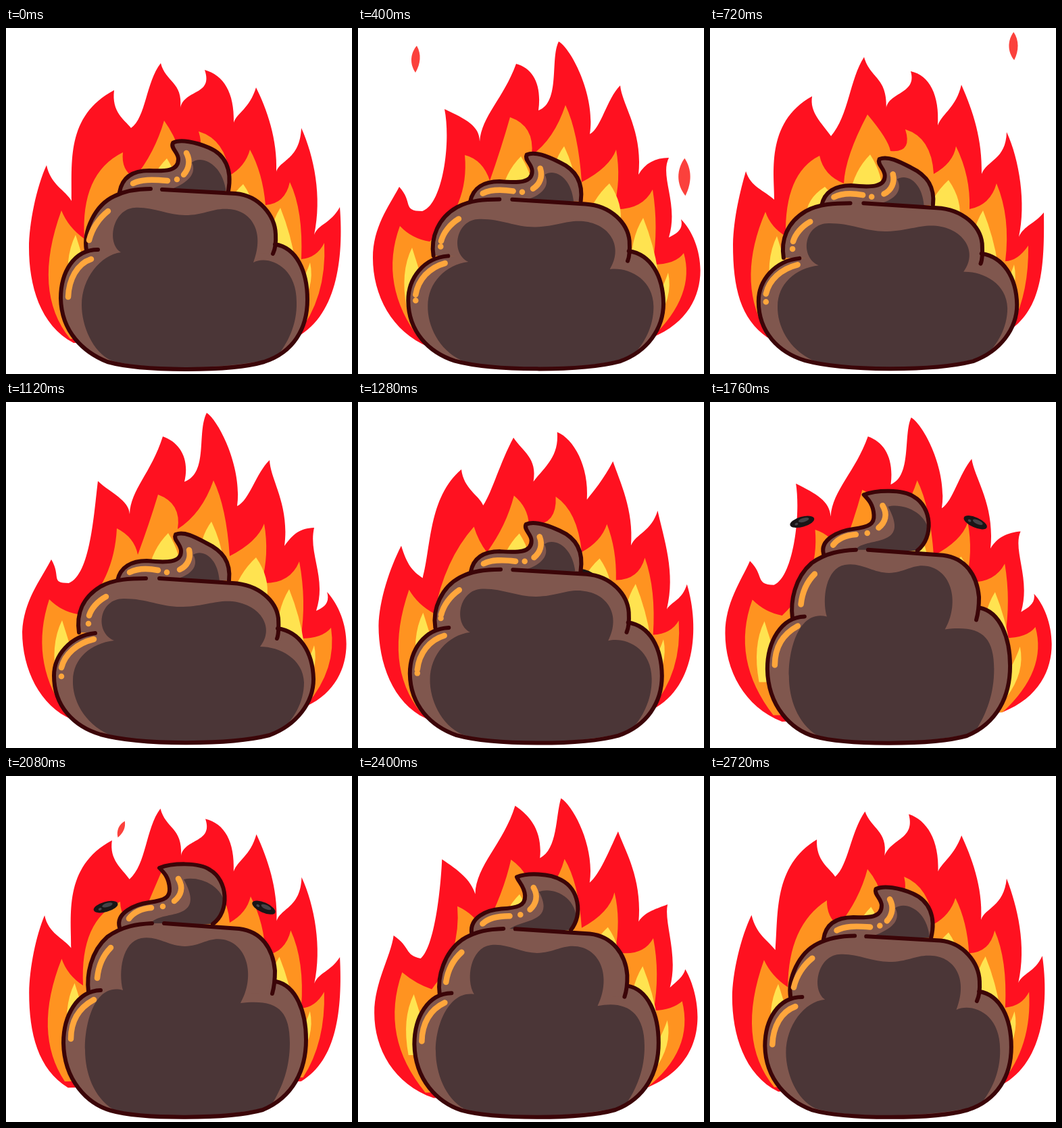
These frames come from a looping animation (512 px wide and 512 px high, 2.8 s). An HTML page with a canvas:

```html
<!DOCTYPE html>
<html>
<head>
<meta charset="utf-8">
<style>
html, body { margin: 0; width: 100%; height: 100%; overflow: hidden; background: #fff; }
canvas { display: block; width: 512px; height: 512px; }
</style>
</head>
<body>
<canvas id="stage" width="512" height="512"></canvas>
<script>
const ctx = document.getElementById('stage').getContext('2d');
const LOOP = 2800, STEP = 80, FLICKER = 688;
const RED = '#ff1120', ORANGE = '#ff9320', YELLOW = '#ffe350', EMBER = '#fb413c';
const BROWN = '#80574e', DARK = '#4b3637', INK = '#3b0508', SHINE = '#ffa63c';

// Moments within one flicker at which the flame poses below are reached
const FLAME_TIMES = [0, .047, .209, .581, .628];

const redPoses = [
  'M100 466C50 440 34 380 34 325C34 290 45 235 60 203C66 232 88 240 97 256C98 200 88 130 160 92C156 125 175 135 185 148C207 133 207 80 229 52C236 80 262 80 258 118C265 90 307 100 294 62C322 70 338 95 337 140C342 125 360 120 370 88C386 120 402 165 400 213C405 195 435 195 437 148C456 190 468 250 456 306C462 290 480 290 494 265C500 340 490 430 425 460Z',
  'M85 458C45 430 34 385 34 320C35 280 45 240 53 212C60 235 80 240 95 254C96 220 80 140 151 101C147 125 165 140 179 160C205 130 207 75 228 43C237 75 262 72 261 118C265 95 307 97 297 64C325 70 340 100 337 144C345 125 364 118 372 84C390 125 403 165 402 216C410 195 438 195 439 154C458 195 468 260 457 309C465 292 480 290 494 273C495 350 492 410 448 444Z',
  'M125 486C60 470 32 425 32 375C33 330 60 270 33 235C65 238 80 245 86 264C80 220 72 155 121 128C114 150 130 170 158 190C155 140 217 80 227 19C240 60 275 72 273 118C280 100 315 105 309 70C330 85 345 115 341 157C350 135 378 135 376 75C402 95 415 150 413 210C420 200 448 205 449 178C470 210 473 275 465 320C470 302 480 292 501 292C475 325 520 420 408 467Z',
  'M105 472C50 450 22 395 22 340C22 295 45 265 61 235C82 258 65 271 95 271C125 262 138 170 128 120C160 135 180 145 180 168C183 130 215 105 234 53C260 60 272 85 267 122C300 110 284 45 297 20C315 30 352 100 343 157C360 148 368 105 388 85C391 115 422 152 415 217C425 200 440 192 460 192C446 220 475 260 460 310C472 304 482 298 478 283C515 320 530 420 435 458Z',
  'M98 470C50 450 24 395 24 340C26 295 50 265 67 233C82 258 65 268 93 268C125 255 130 165 136 117C155 135 182 145 183 166C184 130 215 105 232 51C258 60 272 85 264 118C300 105 282 45 297 16C315 28 350 97 342 154C360 146 370 105 390 86C391 115 420 152 412 213C425 195 435 187 456 186C447 225 475 260 459 309C470 304 480 298 475 281C515 325 520 415 445 450Z'
];

const orangePoses = [
  'M95 460Q38 390 82 270Q92 295 116 312Q110 215 173 184Q170 210 190 222Q220 185 234 137Q250 160 255 178Q298 195 285 153Q325 165 331 218Q354 205 361 180Q380 215 384 262Q413 260 420 228Q440 270 437 342Q460 340 471 318Q475 400 430 455Z',
  'M80 445Q40 370 82 272Q90 295 112 308Q110 215 162 189Q168 218 198 230Q200 190 233 128Q264 165 267 182Q300 185 289 150Q328 162 331 216Q360 200 364 175Q386 220 384 268Q415 262 424 230Q445 280 437 345Q455 345 471 322Q472 390 448 438Z',
  'M115 480Q40 400 77 281Q105 295 118 312Q112 250 122 205Q135 230 165 235Q222 165 231 104Q245 150 262 178Q300 185 300 150Q328 165 331 215Q372 190 371 152Q388 185 386 242Q425 262 437 240Q453 285 441 340Q450 335 472 333Q485 435 405 470Z',
  'M92 462Q30 380 62 293Q80 312 106 316Q165 265 158 188Q185 195 195 226Q212 178 225 132Q262 145 257 188Q290 165 307 114Q326 155 331 228Q372 207 382 180Q390 225 378 268Q420 270 436 239Q445 295 436 350Q470 350 482 333Q500 395 435 458Z',
  'M85 455Q35 380 64 292Q82 310 106 314Q160 265 164 187Q190 200 195 226Q212 180 225 137Q260 150 254 188Q290 165 307 116Q326 155 331 228Q372 207 382 180Q390 225 378 268Q420 270 434 236Q445 295 436 350Q468 350 481 334Q490 395 445 448Z'
];

// Tips of the yellow tongues, one line per pose
const yellowPoses = [
  '103 306 172 262 238 193 300 230 351 231 406 266 450 347',
  '99 308 170 235 237 187 300 230 353 225 404 270 450 350',
  '93 315 172 262 233 138 300 220 361 207 416 280 452 358',
  '80 325 190 255 241 190 305 175 372 230 422 281 459 362',
  '83 323 190 255 240 194 304 177 370 230 419 277 456 360'
];
// Half width, height and sideways shift of each tongue's base
const tongues = [[18, 90, 10], [28, 45, 0], [24, 60, -6], [18, 60, 0], [26, 60, -10], [20, 80, 2], [10, 75, -30]];

// Every part of the pile as [squashed, resting, stretched]
const pile = {
  swirl: [
    'M165 264C169 244 186 235 208 235C238 238 260 238 259 220C258 209 247 204 251 196C264 191 280 200 297 209C320 220 333 236 330 264',
    'M168 243C172 220 188 211 212 211C236 212 255 212 255 194C255 184 243 178 247 170C258 164 281 169 300 177C324 187 335 209 329 241',
    'M168 224C162 203 190 190 212 187C236 184 243 179 242 166C241 150 234 143 227 136C245 129 285 127 302 139C328 154 332 200 306 219'],
  swirlShade: [
    'M240 264C272 260 287 244 277 226C291 217 314 230 316 266Z',
    'M232 242C264 234 284 218 275 199C290 187 322 202 326 245Z',
    'M214 220C222 196 300 220 263 153C290 146 345 170 316 226Z'],
  body: [
    'M132 342C95 346 71 375 71 405C71 450 100 480 140 492C200 508 330 508 390 493C430 478 455 445 455 410C454 370 435 340 402 335',
    'M136 328C100 328 81 362 81 400C82 450 115 480 150 494C200 508 330 509 382 494C425 480 446 445 446 402C446 360 430 325 398 320',
    'M140 317C105 318 85 355 85 395C86 450 120 485 155 495C200 508 330 508 380 494C425 475 444 435 444 390C444 350 430 310 399 304'],
  middle: [
    'M108 341C104 315 112 290 140 273C160 262 185 261 207 261M227 261L335 268C375 270 400 295 403 320C404 338 403 345 401 350',
    'M119 329C114 300 132 262 160 249C178 240 195 238 214 238M231 239L340 245C375 248 398 278 399 305C400 322 397 330 395 334',
    'M122 319C119 295 125 260 150 238C172 222 195 219 216 218M234 218L345 226C378 230 395 255 398 288C398 305 396 315 394 322'],
  shade: [
    'M160 353C130 340 138 290 175 291C210 291 230 304 262 303C295 302 310 293 335 295C378 300 398 335 376 362C405 362 440 380 441 415C441 445 425 470 408 485C340 508 210 508 152 492C115 475 98 440 99 412C99 380 125 357 160 353Z',
    'M170 332C148 318 158 268 190 266C215 264 240 277 265 277C295 277 305 266 330 268C362 270 384 300 366 347C385 336 430 350 430 405C431 440 416 468 400 487C340 505 210 508 156 492C128 480 112 440 112 410C112 370 140 336 170 332Z',
    'M173 317C166 290 172 245 200 240C225 236 240 252 265 252C290 251 300 238 322 242C360 250 368 300 347 336C400 330 420 345 420 395C420 430 410 460 392 488C340 505 210 508 158 493C130 475 117 440 117 405C116 370 130 305 173 317Z'],
  // Zero-length segments become round dots
  shine: [
    'M148 288C135 295 126 306 123 316M122 328L122 328M130 351C105 357 87 373 82 393M82 406L82 406M183 252C195 246 210 246 225 249M238 252L238 252M271 219C274 232 268 243 257 248',
    'M151 271C138 281 127 297 123 314M123 314L123 314M126 342C105 349 93 372 92 398M92 398L92 398M188 230C200 224 215 224 239 226M253 224L253 224M267 185C273 196 271 208 263 217',
    'M155 254C145 264 137 279 135 299M135 299L135 299M130 331C108 343 96 362 96 389M96 389L96 389M182 211C190 200 203 196 215 195M232 193L232 193M255 152C263 165 259 177 249 185']
};

const stretchKeys = { times: [0, 400, 720, 1120, 1200, 1440, 1520, 2080, 2160, 2720],
                      values: [0, -.67, -.92, -1, -1, .85, .92, 1, .98, .08] };
const flyOutKeys = { times: [0, 1200, 1520, 2080, 2400], values: [0, 0, 1, .92, 0] };

// start, end, x, y, dx, dy, height, tilt
const sparks = [
  [0, 500, 61, 246, 30, -250, 66, .1],
  [320, 840, 491, 269, -55, -315, 60, .03],
  [1440, 1760, 474, 215, -15, -200, 56, -.2],
  [1680, 2200, 147, 217, 30, -180, 38, .45]
];

const numbersOf = text => text.match(/-?[\d.]+/g).map(Number);
const fillIn = (template, values) => {
  let i = 0;
  return template.replace(/-?[\d.]+/g, () => values[i++].toFixed(2));
};

// Smooth periodic curve through keys
function spline(times, values, t, period) {
  const n = times.length;
  const time = i => times[(i + n) % n] + Math.floor(i / n) * period;
  const value = i => values[(i + n) % n];
  const slope = i => (value(i + 1) - value(i - 1)) / (time(i + 1) - time(i - 1));
  let k = n - 1;
  while (times[k] > t) k--;
  const span = time(k + 1) - time(k), p = (t - time(k)) / span, q = 1 - p;
  return q * q * (1 + 2 * p) * value(k) + p * p * (3 - 2 * p) * value(k + 1)
    + span * p * q * (q * slope(k) - p * slope(k + 1));
}

const poseTable = poses => ({ template: poses[0], sets: poses.map(numbersOf) });
const [red, orange, yellow] = [redPoses, orangePoses, yellowPoses].map(poseTable);
const flameValues = (table, u) =>
  table.sets[0].map((_, i) => spline(FLAME_TIMES, table.sets.map(s => s[i]), u, 1));

const pileSets = {};
for (const part in pile) pileSets[part] = pile[part].map(numbersOf);

function pilePath(part, s) {
  const [low, rest, high] = pileSets[part];
  const end = s < 0 ? low : high, amount = Math.abs(s);
  return fillIn(pile[part][1], rest.map((v, i) => v + (end[i] - v) * amount));
}

function fill(path, color) {
  ctx.fillStyle = color;
  ctx.fill(new Path2D(path));
}

function stroke(path, color, width) {
  ctx.strokeStyle = color;
  ctx.lineWidth = width;
  ctx.stroke(new Path2D(path));
}

function drawSpark([start, end, x, y, dx, dy, height, tilt], t) {
  const p = (t - start) / (end - start);
  if (p <= 0 || p >= 1) return;
  const h = height / 2 * Math.min(1, 6 * p) * Math.min(1, 3 * (1 - p));
  ctx.save();
  ctx.translate(x + dx * p, y + dy * p);
  ctx.rotate(tilt);
  ctx.scale(h, h);
  fill('M0 -1C.42 -.4 .42 .3 .1 1C-.42 .4 -.42 -.4 0 -1Z', EMBER);
  ctx.restore();
}

function drawFlames(t) {
  const u = t / FLICKER % 1;
  fill(fillIn(red.template, flameValues(red, u)), RED);
  fill(fillIn(orange.template, flameValues(orange, u)), ORANGE);
  const tips = flameValues(yellow, u);
  tongues.forEach(([w, h, shift], i) => {
    const x = tips[2 * i], y = tips[2 * i + 1], base = x + shift;
    fill(`M${base - w} ${y + h}Q${x - w} ${y + h * .4} ${x} ${y}Q${x + w * .8} ${y + h * .5} ${base + w} ${y + h}Z`, YELLOW);
  });
}

function ellipse(x, y, rx, ry, color) {
  ctx.fillStyle = color;
  ctx.beginPath();
  ctx.ellipse(x, y, rx, ry, 0, 0, 2 * Math.PI);
  ctx.fill();
}

function drawPebble(x, y, angle) {
  ctx.save();
  ctx.translate(x, y);
  ctx.rotate(angle);
  ellipse(0, 0, 18.5, 7.5, '#191516');
  ellipse(3, -2, 8, 3, '#444347');
  ellipse(-9, 1, 2.5, 1.8, '#444347');
  ctx.restore();
}

function drawPebbles(t) {
  if (t <= 1200 || t >= 2400) return;
  const out = spline(flyOutKeys.times, flyOutKeys.values, t, LOOP);
  const x = 200 - 57 * out, y = 270 - 83 * out;
  drawPebble(x, y, -.27);
  drawPebble(529 - x, y + 1, .42);
}

function drawPile(t) {
  const s = spline(stretchKeys.times, stretchKeys.values, t, LOOP);
  const path = part => pilePath(part, s);
  const swirl = path('swirl'), body = path('body'), middle = path('middle');

  fill(swirl, BROWN);
  ctx.save();
  ctx.clip(new Path2D(swirl));
  fill(path('swirlShade'), DARK);
  ctx.restore();
  stroke(swirl, INK, 6);

  fill(body, BROWN);
  fill('M' + middle.slice(1).replace('M', 'L'), BROWN);
  fill(path('shade'), DARK);
  stroke(body, INK, 6);
  stroke(middle, INK, 6);
  stroke(path('shine'), SHINE, 8.5);
}

function draw(now) {
  const t = Math.floor(now % LOOP / STEP) * STEP;
  ctx.fillStyle = '#fff';
  ctx.fillRect(0, 0, 512, 512);
  ctx.lineCap = ctx.lineJoin = 'round';
  sparks.forEach(spark => drawSpark(spark, t));
  drawFlames(t);
  drawPebbles(t);
  drawPile(t);
}

let origin;
function tick(now) {
  origin ??= now;
  draw(Math.max(0, now - origin));
  requestAnimationFrame(tick);
}
draw(0);
requestAnimationFrame(tick);
</script>
</body>
</html>
```
